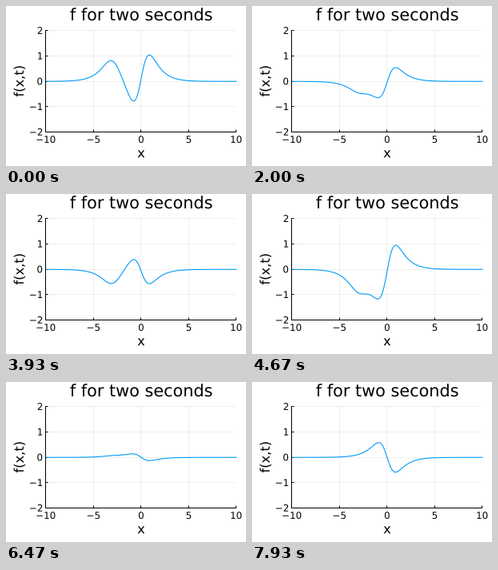
A matplotlib script for the animation above (8000 ms loop, 300x200 px).

```python
import numpy as np
import matplotlib.pyplot as plt
from matplotlib.animation import FuncAnimation
from matplotlib.patches import PathPatch
from matplotlib.textpath import TextPath
from matplotlib.transforms import Affine2D

W, H, DPI = 300, 200, 100
LEFT, RIGHT, TOP, BOTTOM = 49.4, 287.4, 30.36, 157.14
LOOP_MS, TICK_MS = 8000, 20
STEP_MS = 1000 / 15
LEAD_MS = 14  # makes each step land on the tick nearest its true time
PT = 72 / DPI  # points per pixel

plt.rcParams["font.family"] = "DejaVu Sans"
plt.rcParams["path.simplify"] = False

fig = plt.figure(figsize=(W / DPI, H / DPI), dpi=DPI, facecolor="white")
ax = fig.add_axes([LEFT / W, 1 - BOTTOM / H, (RIGHT - LEFT) / W, (BOTTOM - TOP) / H])
ax.set(xlim=(-10, 10), ylim=(-2, 2),
       xticks=range(-10, 11, 5), yticks=range(-2, 3))
ax.set_axisbelow(True)
ax.grid(color="black", alpha=0.1, linewidth=0.6 * PT)
ax.tick_params(direction="in", length=2.6 * PT, width=PT,
               labelbottom=False, labelleft=False)
for side in ("top", "right"):
    ax.spines[side].set_visible(False)
for side in ("bottom", "left"):
    ax.spines[side].set_linewidth(PT)


def label(x, y, text, size, align=0.5, angle=0):
    """Draw text with its baseline at pixel (x, y), y counted from the top."""
    path = TextPath((0, 0), text, size=size)
    box = path.get_extents()
    place = (Affine2D().translate(-box.x0 - align * box.width, 0)
             .rotate_deg(angle).translate(x, H - y))
    fig.add_artist(PathPatch(path, transform=place, facecolor="black",
                             linewidth=0, snap=False))


def signed(n):
    return str(n).replace("-", "\u2212")


# The axis lines snap to whole pixels; text and curve sit half a pixel on.
mid_x = (LEFT + RIGHT) / 2 + 0.5
mid_y = (TOP + BOTTOM) / 2 + 0.5
for n in range(-10, 11, 5):
    label(mid_x + n / 20 * (RIGHT - LEFT), 171, signed(n), 11.9)
for n in range(-2, 3):
    label(45.2, mid_y - n / 4 * (BOTTOM - TOP) + 4.1, signed(n), 11.9, align=1)

label(mid_x, 18, "f for two seconds", 20.8)
label(mid_x, 189.3, "x", 16.3)
label(22, mid_y, "f(x,t)", 16.3, angle=90)

x = np.linspace(-10, 10, 400)
t = np.linspace(0, 4 * np.pi, 200)
bump = 1 / np.cosh(x + 3)
wave = 2 * np.tanh(x) / np.cosh(x)
line, = ax.plot(x, bump + wave, color="#009afa", linewidth=1.1 * PT, clip_on=False,
                transform=ax.transData + Affine2D().translate(0.5, -0.5))


def update(tick):
    now = t[int((tick * TICK_MS + LEAD_MS) / STEP_MS)]
    line.set_ydata(bump * np.cos(2.3 * now) + wave * np.cos(2.8 * now))
    return line,


anim = FuncAnimation(fig, update, frames=LOOP_MS // TICK_MS, interval=TICK_MS,
                     repeat=True, repeat_delay=0)
plt.show()
```
